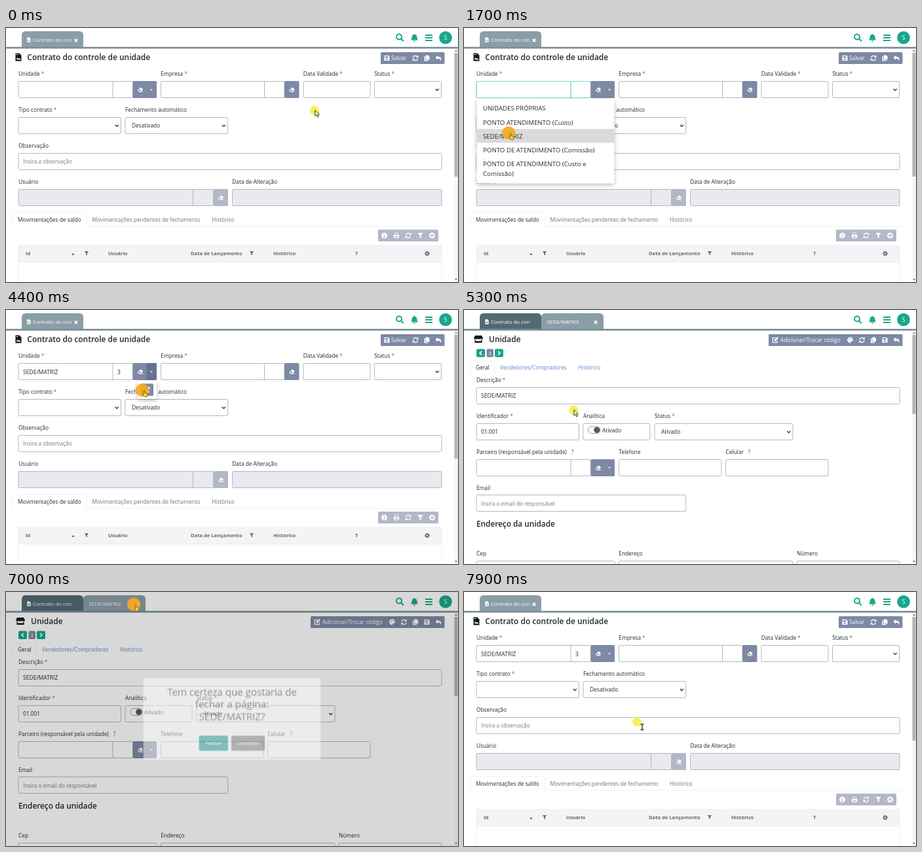
These frames come from a looping animation (690x388 px, 8000 ms). An HTML page:

```html
<!DOCTYPE html>
<html lang="pt-BR">
<head>
<meta charset="utf-8">
<title>Contrato do controle de unidade</title>
<style>
html, body { margin: 0; width: 100%; height: 100%; overflow: hidden; background: #fff; }
svg { display: block; width: 100vw; height: 100vh; font-family: "Open Sans", "Noto Sans", sans-serif; }
.popup { transform-origin: 345px 194px; }
.shadow { filter: drop-shadow(0 2px 3px rgba(0, 0, 0, .28)); }
</style>
</head>
<body>
<script>
const LOOP = 8000;
const TEAL = '#18a78c', SLATE = '#7d89a5', PALE = '#b3b8c8', INK = '#25282c', LINE = '#b3b7bf';
const TAB = '#8b9ea7', TAB_OFF = '#536a75', BAR = '#788f99', FOCUS = '#7be0d5';

// ---- timing helpers (times in ms) ----
let css = '';
function anim(name, frames, easing) {
  const body = frames.map(([t, p]) => `${(t / LOOP * 100).toFixed(3)}%{${p}}`).join('');
  css += `@keyframes ${name}{${body}}.${name}{animation:${name} ${LOOP}ms ${easing} infinite}`;
}
function show(name, ...spans) {
  const frames = [[0, 'opacity:0']];
  for (const [from, to] of spans) frames.push([from, 'opacity:1'], [to, 'opacity:0']);
  anim(name, frames, 'step-end');
}

// ---- drawing helpers ----
const g = (cls, ...parts) => `<g class="${cls}">${parts.join('')}</g>`;
const text = (x, y, s, size = 8.3, fill = INK, extra = '') =>
  `<text x="${x}" y="${y}" font-size="${size}" fill="${fill}" ${extra}>${s}</text>`;
const rect = (x1, y1, x2, y2, fill, r = 0, extra = '') =>
  `<rect x="${x1}" y="${y1}" width="${x2 - x1}" height="${y2 - y1}" rx="${r}" fill="${fill}" ${extra}/>`;
const path = (d, fill, stroke = 'none', w = 1) =>
  `<path d="${d}" fill="${fill}" stroke="${stroke}" stroke-width="${w}"/>`;
const label = (x, y, s, required) =>
  text(x, y, s + (required ? ' <tspan fill="#bf555d">*</tspan>' : ''));
const bold = 'font-weight="600"';

const solid = d => `<path d="${d}" fill="currentColor" fill-rule="evenodd"/>`;
const line = (d, w = 1.4) => `<path d="${d}" fill="none" stroke="currentColor" stroke-width="${w}"/>`;
const icons = {
  file: solid('M-3-4.3h3.8L3-2v6.3h-6zM-1.8 0h3.6v.8h-3.6zM-1.8 1.8h3.6v.8h-3.6z'),
  deed: solid('M-4.5-6h5.7L4.5-2.7V6h-9zM-3.2-4.4h2.6v.9h-2.6zM-3.2 3.4l1.5-3 1.3 2 1-1 2.7 1.6v1z'),
  close: line('M-2.3-2.3L2.3 2.3M2.3-2.3L-2.3 2.3', 1.7),
  search: '<circle cx="-1" cy="-1" r="4" fill="none" stroke="currentColor" stroke-width="2"/>' + line('M2 2L5.8 5.8', 2.2),
  bell: solid('M-.7-6h1.4v1C3-4.5 4-2.8 4-.5c0 2 .5 2.6 1.5 4h-11C-4.5 2-4 1.5-4-.5c0-2.3 1-4 3.3-4.5zM-1.6 4.5h3.2a1.6 1.6 0 0 1-3.2 0z'),
  bars: line('M-5.5-4h11M-5.5 0h11M-5.5 4h11', 1.8),
  save: solid('M-4-4H2.4L4-2.4V4h-8zM-2.8-2.8h4.6v2.2h-4.6zM0 .6a1.3 1.3 0 1 0 .01 0z'),
  sync: line('M-3.5-.8A3.6 3.6 0 0 1 2.6-2.5M3.5.8A3.6 3.6 0 0 1-2.6 2.5') + solid('M4.4-4.5V-.8H.8zM-4.4 4.5V.8H-.8z'),
  copy: solid('M-1.8-4.5H2L4-2.5V2.5h-5.8zM-4-2.8h1.5v6h4.5v1.3h-6z'),
  reply: solid('M-4.5-.8L-.8-4.2v2c3.6 0 5.3 1.2 5.3 3.8 0 1-.5 2-1.3 2.6C3.8 1.8 2.5.8-.8.8v2z'),
  eraser: solid('M-4.3 1L.6-3.8 4.3-.5 1 2.5H4.2v1H-2zM-2.9 1l1.5 1.4H-.3l1.2-1.1L-1.2-.6z'),
  caret: solid('M-2-1h4L0 1.3z'),
  chevron: line('M-2.5-1.3L0 1.2 2.5-1.3', 1.3),
  info: solid('M0-4.4a4.4 4.4 0 1 0 .01 0zM-.7-2.7H.7v1.3H-.7zM-1-.6H.7v2.4h.5v.9h-2.4v-.9h.5V.3H-1z'),
  print: solid('M-2.8-4.3h5.6v2.8h-5.6zM-1.8-3.4h3.6v1.9h-3.6zM-4.3-1h8.6v3.7H3V4.3h-6V2.7h-1.3zM-2 1.2h4v2.1h-4z'),
  filter: solid('M-4.3-4h8.6L1.2-.4V4.3L-1.2 2.6v-3z'),
  plus: solid('M0-4.4a4.4 4.4 0 1 0 .01 0zM-.7-2.5H.7v1.8h1.8V.7H.7v1.8H-.7V.7h-1.8V-.7h1.8z'),
  gear: '<circle r="2.3" fill="none" stroke="currentColor" stroke-width="1.7"/><circle r="3.6" fill="none" stroke="currentColor" stroke-width="1.3" stroke-dasharray="1.4 1.427"/>',
  store: solid('M-5-5.5h10L7-1.6C7 .2 4.7.6 3.6-.6 2.6.5.9.5 0-.5-.9.5-2.6.5-3.6-.6-4.7.6-7 .2-7-1.6zM-5.6 1h1.4v2h8.4V1h1.4v4.6H-5.6z'),
  edit: line('M1-3.3h-4.7v7h7V.5', 1.2) + solid('M-1.6 1.8l.4-2.2L3.2-4.7 5-2.9.6 1.5z'),
  palette: solid('M0-4.4C-2.5-4.4-4.4-2.4-4.4 0S-2.3 4.4 0 4.4C1.3 4.4.4 2.6 1 2c.7-.8 3.4.5 3.4-2S2.4-4.4 0-4.4zM-2.5-1h1.2v1.2h-1.2zM-1-3h1.2v1.2H-1zM1.4-2.3h1.2v1.2H1.4z'),
  open: line('M-.5-2.8h-3.3v6.6h6.6V.6M-1.2 1.2L3.4-3.4', 1.3) + solid('M.6-4.5h4v4z'),
  left: line('M1.5-2.8L-1.5 0 1.5 2.8', 1.6),
  right: line('M-1.5-2.8L1.5 0-1.5 2.8', 1.6)
};
const icon = (name, x, y, color = '#fff', k = 1) =>
  `<g transform="translate(${x} ${y}) scale(${k})" color="${color}">${icons[name]}</g>`;
const iconRow = (y, list) => list.map(([n, x]) => icon(n, x, y)).join('');

// every field is one row high; y is the centre of its top border
const ROW = 25;
const box = (x1, y, x2, fill = '#fff', stroke = LINE) =>
  rect(x1, y, x2, y + ROW, fill, 1.6, `stroke="${stroke}" stroke-width="1"`);
const select = (x1, y, x2, value = '') =>
  box(x1, y, x2) + text(x1 + 10, y + 15.8, value) + icon('chevron', x2 - 6.3, y + 12.8, '#33363a');
const lookup = (x1, mid, btn, x2, y, off) =>
  box(x1, y, btn, off ? '#e9e9ef' : '#fff') + path(`M${mid} ${y}v${ROW}`, 'none', LINE) +
  rect(btn, y - .5, x2, y + ROW + .5, off ? PALE : SLATE, 1.6) + icon('eraser', btn + 11.5, y + 12.7);

const tabShape = (x1, x2, fill) =>
  path(`M${x1} 30V11q0-6 6-6H${x2 - 6}q6 0 6 6V30z`, fill);
const firstTab = fill => tabShape(24, 118, fill) + icon('file', 35, 18, '#fff', .9) +
  `<g clip-path="url(#tabClip)">${text(41, 21, 'Contrato do controle', 7.9, '#fff')}</g>`;
const scrollbar = end => rect(684, 32, 690, 388, '#f6f6f6') + rect(684.5, 38, 689.5, end, '#b4b4b4') +
  path('M685 36l2-2.5 2 2.5zM685 383l2 2.5 2-2.5z', '#777');

// ---- contract page ----
const table = g('table',
  rect(568, 308, 660, 326, PALE, 1.6),
  iconRow(317, [['info', 577.5], ['print', 596], ['sync', 614], ['filter', 632.5], ['plus', 650.5]]),
  rect(19, 332, 665, 357.5, '#f4f4f6'),
  path('M19 388V332H665V388M19 357.5H665', 'none', '#e9eaed', .8),
  ...[[30, 'Id'], [156, 'Usuário'], [282, 'Data de Lançamento'], [408, 'Histórico'], [533, 'T']]
    .map(([x, s]) => text(x, 347, s, 7.6, '#66686e', 'font-weight="700"')),
  icon('caret', 102.5, 346, '#55585e', 1.2),
  icon('filter', 123, 344, '#66686e', .75), icon('filter', 375, 344, '#66686e', .75),
  icon('gear', 643, 344.5, '#55585e', .9));

const contract = g('contract',
  firstTab(TAB), icon('close', 107, 18.8),
  icon('deed', 19, 44.5, '#15171a'),
  text(32.3, 49, 'Contrato do controle de unidade', 11.97, INK, bold),
  rect(572, 37, 669.5, 55, SLATE, 1.6), text(588, 49, 'Salvar', 8.3, '#fff'),
  iconRow(46, [['save', 581.5], ['sync', 625], ['copy', 642.5], ['reply', 660]]),
  label(19, 73, 'Unidade', 1), label(236.3, 73, 'Empresa', 1),
  label(453.8, 73, 'Data Validade', 1), label(562.3, 73, 'Status', 1),
  lookup(19, 163, 193.5, 230, 81.5), icon('caret', 222, 94.5),
  lookup(236.5, 394.5, 425, 447.5, 81.5),
  box(454, 81.5, 556), select(562.5, 81.5, 664.5),
  label(19, 128, 'Tipo contrato', 1), label(182, 128, 'Fechamento automático'),
  select(19, 136.5, 175.5), select(182, 136.5, 338.7, 'Desativado'),
  label(19, 183, 'Observação'), box(19, 191.5, 665),
  text(26, 207, 'Insira a observação', 8.3, '#75797f'),
  label(19, 237.5, 'Usuário'), label(345.3, 237.5, 'Data de Alteração'),
  lookup(19, 285.5, 316.5, 339, 246.5, 1), box(345.5, 246.5, 665, '#e9e9ef'),
  path('M9.5 303V284q0-2 2-2H121q2 0 2 2V303H671', 'none', '#eceef1', .8),
  text(18, 295.7, 'Movimentações de saldo', 8.35),
  text(131.5, 295.7, 'Movimentações pendentes de fechamento', 8.3, '#6d737b'),
  text(314, 295.7, 'Histórico', 8.3, '#6d737b'),
  table,
  g('value', text(26, 97.5, 'SEDE/MATRIZ', 8.55), text(170, 97.5, '3')),
  g('jump', rect(214.5, 81, 230, 107, '#66728f', 1.6), icon('caret', 222, 94.5),
    rect(201, 108.5, 230, 136, '#fff', 2, 'class="shadow"'),
    rect(205, 112.5, 225, 131, SLATE, 1.6), icon('open', 215, 122)),
  g('menu',
    box(19, 81.5, 163, 'none', FOCUS), path('M163 81.5H193.5M163 106.5H193.5', 'none', FOCUS),
    rect(19.5, 108.5, 229.5, 237.5, '#fff', 2.5, 'class="shadow"'),
    g('hover', rect(19.5, 154.3, 229.5, 175.3, '#dadada')),
    ...[[126.3, 'UNIDADES PRÓPRIAS'], [147.5, 'PONTO ATENDIMENTO (Custo)'], [168.6, 'SEDE/MATRIZ'],
      [189.7, 'PONTO DE ATENDIMENTO (Comissão)'], [210.9, 'PONTO DE ATENDIMENTO (Custo e'], [225.9, 'Comissão)']]
      .map(([y, s]) => text(29, y, s, 9.7))),
  scrollbar(227));

// ---- unit page ----
const form = g('form',
  icon('store', 22, 44.5, '#15171a'), text(38, 49, 'Unidade', 11.97, INK, bold),
  rect(465, 37, 669.5, 55, SLATE, 1.6), text(483, 49, 'Adicionar/Trocar código', 8.3, '#fff'),
  iconRow(46, [['edit', 475], ['palette', 589.5], ['sync', 607.5], ['copy', 625], ['save', 642.5], ['reply', 660]]),
  rect(19, 59.5, 32, 72, TEAL, 2), icon('left', 25.5, 65.8),
  rect(34.5, 59.5, 45, 72, SLATE, 2), text(39.7, 68.7, '3', 7.5, '#fff', 'text-anchor="middle"'),
  rect(47, 59.5, 60, 72, TEAL, 2), icon('right', 53.5, 65.8),
  path('M9.5 98V80q0-2 2-2H44q2 0 2 2V98', 'none', '#eceef1', .8),
  text(18, 91.3, 'Geral'), text(55, 91.3, 'Vendedores/Compradores', 8.25, '#5b86c6'),
  text(174, 91.3, 'Histórico', 8.25, '#5b86c6'),
  label(19, 110, 'Descrição', 1), box(19, 118.5, 665),
  label(19, 164.7, 'Identificador', 1), label(182, 164.7, 'Analítica'), label(291, 164.7, 'Status', 1),
  box(19, 173.5, 175.5), box(182, 173.5, 284), select(291, 173.5, 502, 'Ativado'),
  rect(189.5, 178, 208, 188.5, '#fff', 5.25, 'stroke="#8d9096" stroke-width=".9"'),
  '<circle cx="202.8" cy="183.3" r="4.6" fill="#55585f"/>', text(211, 186.7, 'Ativado'),
  label(19, 219.7, 'Parceiro (responsável pela unidade)'), text(163.8, 219.7, '?', 8.3, '#555'),
  label(236.3, 219.7, 'Telefone'), label(399.5, 219.7, 'Celular'), text(433.5, 219.7, '?', 8.3, '#555'),
  lookup(19, 163, 193.5, 230, 228.5), icon('caret', 222, 241),
  box(236.5, 228.5, 393), box(399.5, 228.5, 556),
  label(19, 274.7, 'Email'), box(19, 282.5, 338.7),
  text(26, 298.7, 'Insira o email do responsável', 8.3, '#75797f'),
  text(19, 330.5, 'Endereço da unidade', 11.8, INK, bold),
  label(19, 374.7, 'Cep'), label(236.3, 374.7, 'Endereço'), label(508, 374.7, 'Número'),
  box(19, 383.5, 230), box(236.5, 383.5, 502), box(508, 383.5, 665),
  g('filled', text(26, 134.3, 'SEDE/MATRIZ', 8.55), text(26, 189.2, '01.001')),
  scrollbar(159));

const unit = g('unit', firstTab(TAB_OFF), tabShape(118, 213, TAB),
  text(126.5, 21, 'SEDE/MATRIZ', 7.85, '#fff'), icon('close', 201, 18.8), form);

// ---- shared layers ----
const header = rect(0, 28.8, 690, 31.5, BAR) +
  icon('search', 601, 14.5, TEAL) + icon('bell', 623.5, 15, TEAL) + icon('bars', 645.5, 15, TEAL) +
  `<circle cx="671" cy="14.8" r="9.8" fill="${TEAL}"/>` + text(671, 18.2, 'S', 9, '#fff', 'text-anchor="middle"');

const loading = g('loading', rect(0, 380, 229, 388, '#222327', 1),
  text(2, 385.8, 'Aguardando demonstracao.modelo.test...', 3.8, '#f2f2f2', bold));

const mid = 'text-anchor="middle"';
const dialog = g('dim', rect(0, 0, 690, 388, '#000')) + g('popup',
  rect(191, 123.5, 499, 265, '#fff', 2.5),
  ...['Tem certeza que gostaria de', 'fechar a página:', 'SEDE/MATRIZ?']
    .map((s, i) => text(345, 153.3 + i * 21.6, s, 17.2, '#4b4b4b', mid + ' font-weight="500"')),
  g('buttons',
    rect(287.5, 223, 338, 249.3, '#26a69a', 2), text(312.7, 239.5, 'Fechar', 8.8, '#fff', `${mid} ${bold}`),
    rect(344, 223, 402, 249.3, '#8b8b8b', 2), text(373, 239.5, 'Cancelar', 8.8, '#fff', `${mid} ${bold}`)));

const cursor = g('cursor',
  g('idle', '<circle r="7" fill="#f6ee45" opacity=".88"/>'),
  g('press', '<circle cy=".4" r="10.1" fill="#f4aa22" opacity=".93"/>'),
  g('arrow', path('M.8-.5V8.7L3 6.7 4.6 10.3 6.2 9.5 4.7 6.2H7.5z', '#fdf7b0', '#2b2b20', .9)),
  g('hand', path('M2.3 1.2q1-.9 1.7 0V4.6L7.3 5.3q1 .4.9 1.5L7.5 10.5H3.3L.7 7.2q0-1.2 1.6-.4z', '#f7cf45', '#5a4715', .7)),
  g('beam', path('M5.5 3.5H7.3Q8 3.5 8 4.3 8 3.5 8.7 3.5H10.5M8 4V11.5M5.5 12H7.3Q8 12 8 11.2 8 12 8.7 12H10.5', 'none', '#222', 1.3)));

// ---- timeline ----
show('contract', [0, 4450], [7550, LOOP]);
show('unit', [4450, 7550]);
show('form', [4850, LOOP]);
show('filled', [5250, LOOP]);
show('table', [0, 1950], [2900, LOOP]);
show('value', [1850, LOOP]);
show('menu', [750, 1850]);
show('hover', [1280, 1850]);
show('loading', [2050, 2950]);
show('jump', [3650, 4450]);

const presses = [[690, 990], [1590, 1880], [3590, 3790], [4390, 4590], [6890, 7090], [7490, 7690]];
const gaps = list => [...list, [LOOP, LOOP]].map(([from], i) => [i ? list[i - 1][1] : 0, from]);
const hands = [[250, 2050], [3150, 4800], [6600, 7790]];
show('press', ...presses);
show('idle', ...gaps(presses));
show('hand', ...hands);
show('arrow', ...gaps(hands).slice(0, -1));
show('beam', [7790, LOOP]);

// arrive, leave, x, y
const stops = [[0, 30, 471, 126], [300, 950, 222, 94], [1480, 1820, 68, 160], [2400, 2780, 163.5, 118.5],
  [3300, 3900, 222, 94], [4200, 4750, 208, 122], [5500, 6020, 160, 158], [6700, 7020, 195, 18.5],
  [7450, 7720, 305, 244], [7900, LOOP, 264, 198.5]];
anim('cursor', stops.flatMap(([from, to, x, y]) =>
  [from, to].map(t => [t, `transform:translate(${x}px,${y}px)`])), 'ease-in-out');

anim('dim', [[0, 'opacity:0'], [6940, 'opacity:0'], [7100, 'opacity:.4'], [7590, 'opacity:.4'],
  [7695, 'opacity:0'], [LOOP, 'opacity:0']], 'linear');
const pop = (o, k) => `opacity:${o};transform:scale(${k})`;
anim('popup', [[0, pop(0, .7)], [6940, pop(0, .7)], [7060, pop(1, 1.05)], [7130, pop(1, .97)], [7200, pop(1, 1)],
  [7600, pop(.98, 1)], [7695, pop(0, .5)], [LOOP, pop(0, .5)]], 'linear');
anim('buttons', [[0, 'opacity:1'], [7550, 'opacity:.55'], [7750, 'opacity:1']], 'step-end');

const style = document.createElement('style');
style.textContent = css;
document.head.append(style);
document.body.innerHTML = `<svg viewBox="0 0 690 388" preserveAspectRatio="none">
  <clipPath id="tabClip"><rect x="40" y="8" width="60.8" height="20"/></clipPath>
  ${contract}${unit}${header}${loading}${dialog}${cursor}</svg>`;
</script>
</body>
</html>
```
